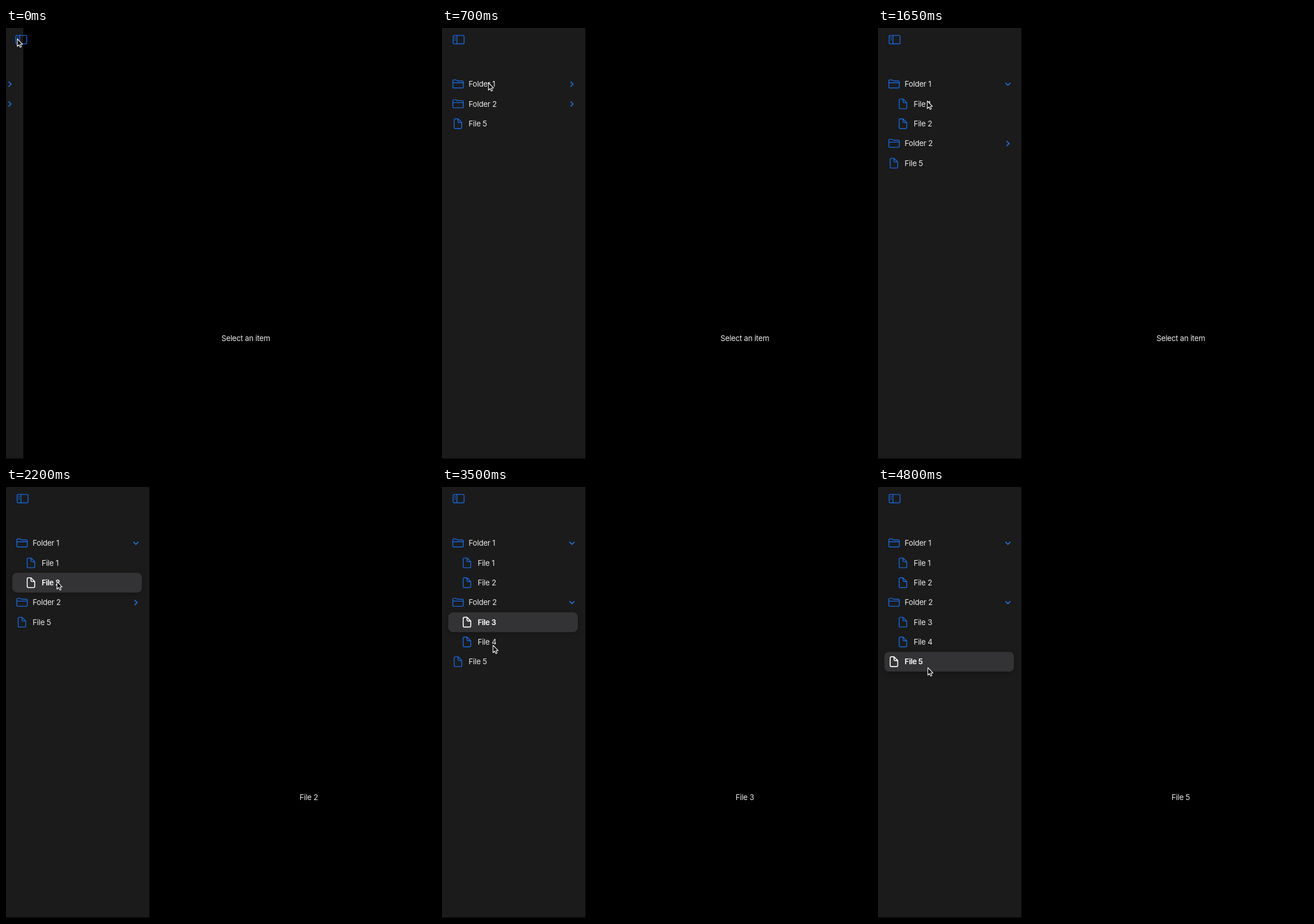
Animation of 747x749 px, one loop 5.05 s. Source, as an HTML page:

```html
<!DOCTYPE html>
<html lang="en">
<head>
<meta charset="utf-8">
<title>Sidebar outline</title>
<style>
  html, body { margin: 0; width: 100%; height: 100%; overflow: hidden; background: #000; }
  svg { display: block; width: 747px; height: 749px; }
  text { font: 400 13.2px Inter, "Open Sans", sans-serif; letter-spacing: -.26px; fill: #ebebeb; white-space: pre; }
  .icon { fill: none; stroke: #176ae0; stroke-width: 1.4; stroke-linejoin: round; stroke-linecap: round; }
  .chevron { stroke: #226fd2; stroke-width: 1.8; }
  .selected .icon { stroke: #fff; stroke-width: 1.6; }
  .selected text { fill: #fff; font-weight: 600; letter-spacing: -.4px; }
  #pill { fill: #333335; filter: drop-shadow(0 2px 5px rgba(0, 0, 0, .3)); }
</style>
</head>
<body>
<svg viewBox="0 0 747 749">
  <rect width="747" height="749"/>
  <text id="detail" y="543.6" text-anchor="middle"></text>
  <g id="sidebar">
    <rect width="249" height="748" fill="#1b1b1b"/>
    <rect id="pill" x="11" width="225" height="34.4" rx="8"/>
    <g id="rows"></g>
  </g>
  <g id="toggle" class="icon">
    <rect x="19.4" y="12.9" width="19" height="14.6" rx="2.2"/>
    <path d="M26 13V27.4"/>
    <path d="M21.8 16.2h1.8M21.8 18.7h1.8M21.8 21.2h1.8" stroke-width="1"/>
  </g>
  <path id="cursor" d="M.6 1V14L3.5 11.2L5.5 15.6L7.7 14.6L5.7 10.3H9.7Z" stroke="#fff" stroke-width="1.1" stroke-linejoin="round"/>
</svg>
<script>
const LOOP = 5050, STEP = 50;
const TOP = 97.5, PITCH = 34.35, WIDTH = 249;
const OPEN_1 = 865, OPEN_2 = 2630;

// time, x, y of the pointer tip
const POINTER = [
  [0, 19, 18], [300, 19, 18], [650, 80, 94], [950, 80, 94],
  [1500, 85, 126], [1850, 85, 126], [2100, 88, 162], [2250, 88, 164],
  [2600, 97, 204], [2800, 97, 204], [3100, 91, 238], [3200, 91, 238],
  [3500, 88, 274], [3750, 88, 274], [4050, 86, 313]
];

const SELECTED = [[1750, 'File 1'], [2150, 'File 2'], [3150, 'File 3'], [3650, 'File 4'], [4100, 'File 5']];

// rows with `shown` belong to the folder that opens at that time
const ROWS = [
  { name: 'Folder 1', slot: 0, opens: OPEN_1 },
  { name: 'File 1', slot: 1, shown: OPEN_1 },
  { name: 'File 2', slot: 2, shown: OPEN_1 },
  { name: 'Folder 2', slot: 1, opens: OPEN_2, pushedBy: [OPEN_1] },
  { name: 'File 3', slot: 4, shown: OPEN_2 },
  { name: 'File 4', slot: 5, shown: OPEN_2 },
  { name: 'File 5', slot: 2, pushedBy: [OPEN_1, OPEN_2] }
];

const FOLDER = 'M-9 -5.2Q-9 -7.2 -7 -7.2H-4Q-3 -7.2 -2.2 -6.5L-1.6 -6Q-1 -5.5 0 -5.5H7.2Q9.2 -5.5 9.2 -3.5V4.8Q9.2 6.8 7.2 6.8H-7Q-9 6.8 -9 4.8ZM-9 -2.2H9.2';
const FILE = 'M-4.6 -8.5H0L6.5 -2V6.3Q6.5 8.5 4.3 8.5H-4.6Q-6.6 8.5 -6.6 6.3V-6.3Q-6.6 -8.5 -4.6 -8.5ZM0 -8.5V-3.6Q0 -2 1.6 -2H6.5';

const $ = id => document.getElementById(id);
const clamp = v => Math.min(1, Math.max(0, v));
const ease = p => p * p * (3 - 2 * p);
const progress = (t, start, length) => ease(clamp((t - start) / length));
const move = (el, x, y, extra = '') => el.setAttribute('transform', `translate(${x} ${y})${extra}`);

function add(parent, tag, attrs) {
  const el = document.createElementNS('http://www.w3.org/2000/svg', tag);
  for (const key in attrs) el.setAttribute(key, attrs[key]);
  return parent.appendChild(el);
}

for (const row of ROWS) {
  const indent = row.shown ? 15.6 : 0;
  row.el = add($('rows'), 'g', {});
  add(row.el, 'path', {
    class: 'icon', d: row.opens ? FOLDER : FILE,
    transform: `translate(${27.8 + indent} 0)`
  });
  add(row.el, 'text', { x: 46.3 + indent, y: 4.7 }).textContent = row.name;
  if (row.opens) row.chevron = add(row.el, 'path', { class: 'icon chevron', d: 'M-1.9 -3.9L2 0L-1.9 3.9' });
}

function pointerAt(t) {
  const i = POINTER.findIndex(k => k[0] > t);
  if (i < 0) return POINTER[POINTER.length - 1].slice(1);
  const [t0, x0, y0] = POINTER[i - 1], [t1, x1, y1] = POINTER[i];
  const p = progress(t, t0, t1 - t0);
  return [x0 + (x1 - x0) * p, y0 + (y1 - y0) * p];
}

function draw(t) {
  // critically damped slide, already under way when the loop begins
  const phase = (t + 30) * 0.0199;
  const hidden = (1 + phase) * Math.exp(-phase);
  move($('sidebar'), -WIDTH * hidden, 0);
  move($('toggle'), -2.8 * hidden, 0);

  const choice = SELECTED.filter(s => s[0] <= t).pop();
  const name = choice ? choice[1] : '';
  $('detail').textContent = name || 'Select an item';
  $('detail').setAttribute('x', 526 - WIDTH * hidden / 2);
  $('pill').style.display = name ? '' : 'none';

  for (const row of ROWS) {
    let slot = row.slot;
    for (const start of row.pushedBy || []) slot += 2 * progress(t, start, 300);
    const y = TOP + slot * PITCH;
    move(row.el, 0, y);
    if (row.shown) row.el.setAttribute('opacity', progress(t, row.shown, 300));
    if (row.opens) move(row.chevron, 225.7, 0.2, ` rotate(${90 * progress(t, row.opens, 240)})`);
    row.el.setAttribute('class', row.name === name ? 'selected' : '');
    if (row.name === name) $('pill').setAttribute('y', y - PITCH / 2);
  }
  move($('cursor'), ...pointerAt(t));
}

const begin = performance.now();
function tick() {
  const t = (performance.now() - begin) % LOOP;
  draw(Math.min(4800, Math.floor(t / STEP) * STEP));
  requestAnimationFrame(tick);
}
tick();
</script>
</body>
</html>
```
